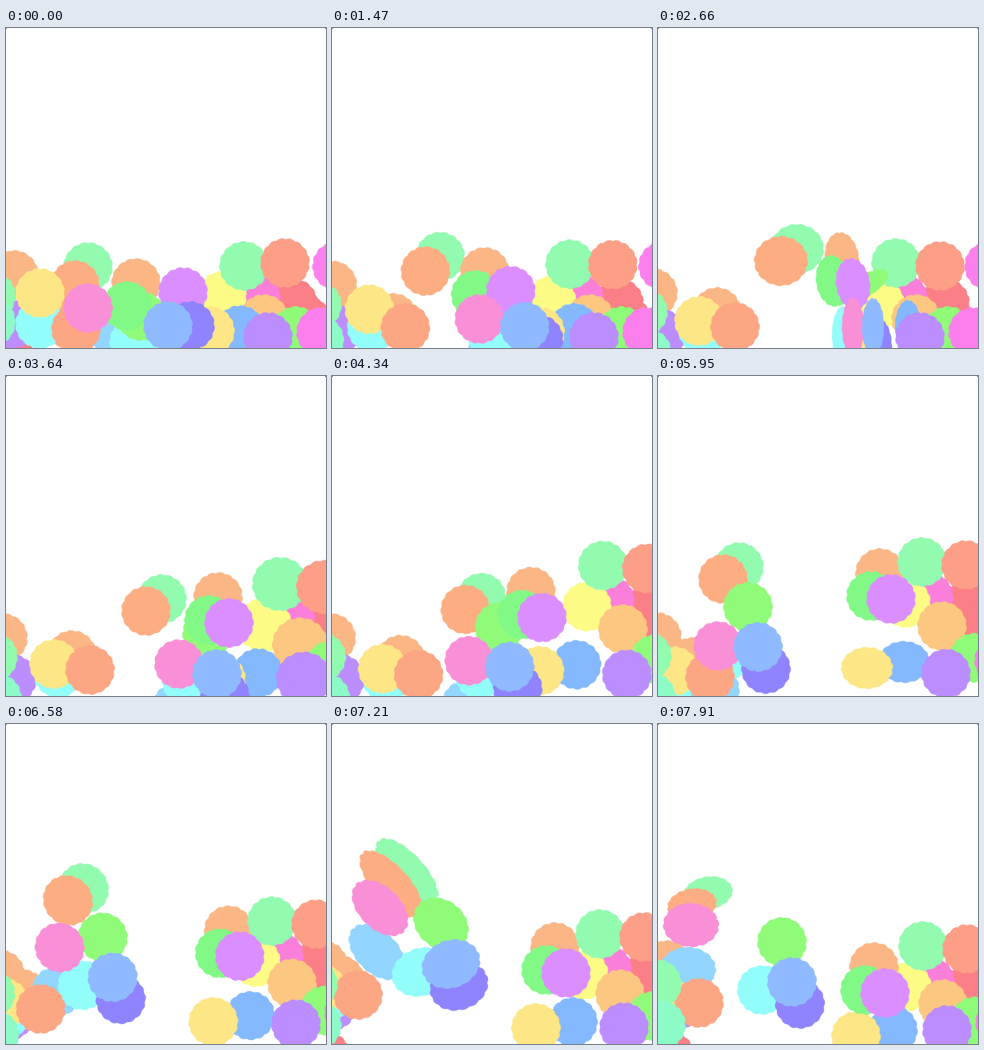
An HTML page with a canvas that plays this animation: 320 by 320 pixels, repeating every 7980 ms.

```html
<!DOCTYPE html>
<html lang="en">
<head>
<meta charset="utf-8">
<title>Soft pompoms</title>
<style>
html, body { margin: 0; width: 100%; height: 100%; overflow: hidden; background: #fff; }
canvas { display: block; width: 100vw; height: 100vh; }
</style>
</head>
<body>
<canvas id="stage"></canvas>
<script>
const SIZE = 320, LOOP = 7980, STEP = 70;
const R = 24.7, LOBES = 16, PULSE = 380;
const TIMES = [0, 2660, 3640, 5110, 5950, 7210, 7910];
const canvas = document.getElementById('stage');
const ctx = canvas.getContext('2d');

const COLORS = {
  orange: '#fab785', peach: '#fcae82', salmon: '#fda683', coral: '#fc9f86',
  red: '#fa7f86', mint: '#92fbaf', aqua: '#8dfbc8', lime: '#90fb78',
  green: '#82f987', cyan: '#93fdfa', sky: '#92d5ff', blue: '#84b8ff',
  azure: '#8fbaff', indigo: '#8f83fe', purple: '#bb8dff', violet: '#db8eff',
  pink: '#f98fd6', rose: '#f97fdb', magenta: '#fb80ee', lemon: '#fbfb85',
  yellow: '#fde685', apricot: '#fcc780'
};

// Stretch tensor for an ellipse with half axes a, b turned by deg.
function tensor(a, b, deg = 0) {
  const q = deg * Math.PI / 180, c = Math.cos(q), s = Math.sin(q);
  return [a * c * c + b * s * s, (a - b) * c * s, a * s * s + b * c * c];
}

// Shared travel of a cluster: offsets from home at TIMES; squash: key -> [a, b, deg].
const CLUSTERS = {
  wall: { x: [0, -6, -4, 0, -2, -10, 8], y: [0, 16, 13, 13, 12, -8, -8] },
  floor: { x: [0, 3, 10, 14, -22, -48, -33], y: [0, 11, 6, 16, 13, -17, -9] },
  head: {
    x: [0, 55, 72, 48, -3, -9, -34], y: [0, -21, -19, -25, -51, -94, -73],
    squash: { 1: [27, 25], 3: [29, 16, -18], 5: [43, 18, 48], 6: [25, 16, -12] }
  },
  hop: {
    x: [0, 113, 91, 10, -22, -34, -49], y: [0, 19, 8, 1, -10, -96, -79],
    squash: { 1: [11, 30], 3: [15, 27], 5: [34, 21, 45], 6: [28, 22] }
  },
  swing: {
    x: [0, 53, 49, -35, -62, -43, -28], y: [0, 1, 0, -19, -27, -58, -40],
    squash: { 1: [11, 29], 3: [22, 38, 6], 5: [30, 24, -20] }
  },
  shove: {
    x: [0, 54, 82, 54, 92, 93, 86], y: [0, -25, -34, -46, -58, -32, -12],
    squash: { 1: [17, 26, -8] }
  },
  low: {
    x: [0, 13, 15, -1, 9, 4, -2], y: [0, -1, -2, -19, -13, -1, 7],
    squash: { 1: [13, 26], 3: [24, 21], 4: [26, 21] }
  },
  pile: {
    x: [0, 0, 36, 28, 26, 30, 27], y: [0, 0, -27, -57, -49, -25, -13],
    squash: { 2: [28, 27] },
    lift: y => Math.min(1, (316 - y) / 30)  // upper balls are heaved higher
  }
};

const balls = [];

// Home place, then a lasting shift against the cluster and a turn of the squash.
function ball(cluster, color, x, y, dx = 0, dy = 0, turn = 0) {
  const { lift, squash = {}, ...track } = CLUSTERS[cluster];
  const pulses = Object.entries(squash).map(([k, [a, b, deg = 0]]) => {
    const m = tensor(a, b, deg + turn);
    return { t: TIMES[k], d: [m[0] - R, m[1], m[2] - R] };
  });
  balls.push({ color: COLORS[color], x, y, dx, dy, track, pulses, lift: lift ? lift(y) : 1, seed: balls.length * 1.7 });
}

ball('wall', 'red', 4, 328, 0, 12);
ball('wall', 'orange', 8, 247, -7, 2);
ball('floor', 'orange', 66, 298, -10, -25);
ball('head', 'mint', 82, 239, 2, 3);
ball('head', 'peach', 69, 257, -1, -3);
ball('wall', 'purple', 6, 296, 4, -6);
ball('floor', 'cyan', 34, 296, 8, -5);
ball('hop', 'sky', 112, 310, -33, 14);
ball('swing', 'cyan', 128, 314, 4, -8);
ball('floor', 'yellow', 34, 265, 4, 17);
ball('floor', 'salmon', 70, 301, 4, -13);

ball('pile', 'magenta', 331, 238);
ball('pile', 'red', 287, 275);
ball('pile', 'red', 300, 292, -10);
ball('pile', 'rose', 250, 270, -5);
ball('pile', 'lemon', 216, 268, 6, 8);
ball('shove', 'orange', 130, 255);
ball('pile', 'mint', 238, 238, 0, -3);
ball('pile', 'coral', 279, 235, 3, 3);
ball('pile', 'apricot', 258, 291);
ball('pile', 'lime', 290, 303);
ball('pile', 'magenta', 315, 304);
ball('low', 'blue', 234, 302, 3, -3);
ball('low', 'yellow', 204, 303, -4, 2);
ball('pile', 'purple', 262, 309);

ball('swing', 'lime', 135, 288, 17, -30, 59);
ball('shove', 'green', 121, 278);
ball('shove', 'violet', 177, 264, -36, 17);
ball('swing', 'indigo', 184, 298, -14, 22);
ball('hop', 'pink', 82, 280);
ball('swing', 'azure', 162, 298);
ball('wall', 'mint', -15, 268, 6, 0);
ball('wall', 'aqua', -15, 294, 10, 15);

const smooth = u => u * u * (3 - 2 * u);

function slope(v, k) {
  if (k === 0) return 0;
  const a = (v[k] - v[k - 1]) / (TIMES[k] - TIMES[k - 1]);
  if (k === TIMES.length - 1) return a * 0.6;
  const b = (v[k + 1] - v[k]) / (TIMES[k + 1] - TIMES[k]);
  return a * b <= 0 ? 0 : 2 * a * b / (a + b);
}

// Smooth path through the keys without overshoot.
function along(v, t) {
  let k = 0;
  while (k < TIMES.length - 2 && t >= TIMES[k + 1]) k++;
  const h = TIMES[k + 1] - TIMES[k];
  const u = Math.min(1, (t - TIMES[k]) / h), w = 1 - u;
  return v[k] + (v[k + 1] - v[k]) * smooth(u)
    + h * u * w * (w * slope(v, k) - u * slope(v, k + 1));
}

function shape(b, t) {
  const m = [R, 0, R];
  for (const p of b.pulses) {
    const w = Math.exp(-(((t - p.t) / PULSE) ** 2));
    for (let i = 0; i < 3; i++) m[i] += w * p.d[i];
  }
  return m;
}

function drawBall(b, t) {
  const settle = smooth(Math.min(1, t / TIMES[1]));
  const x = b.x + along(b.track.x, t) + b.dx * settle;
  const y = b.y + along(b.track.y, t) * b.lift + b.dy * settle;
  const [a, c, d] = shape(b, t);
  const roll = b.seed + (x - b.x) / 70;
  ctx.beginPath();
  for (let i = 0; i < 128; i++) {
    const q = i / 128 * Math.PI * 2;
    const r = 0.95 + 0.05 * Math.abs(Math.sin((q + roll) * LOBES / 2));
    const px = Math.cos(q) * r, py = Math.sin(q) * r;
    ctx.lineTo(x + a * px + c * py, y + c * px + d * py);
  }
  ctx.closePath();
  ctx.fillStyle = ctx.strokeStyle = b.color;
  ctx.fill();
  ctx.globalAlpha = 0.4;
  ctx.stroke();
  ctx.globalAlpha = 1;
}

function fit() {
  const s = window.devicePixelRatio || 1;
  canvas.width = Math.round(innerWidth * s);
  canvas.height = Math.round(innerHeight * s);
}

function draw(now) {
  const t = Math.floor((now % LOOP) / STEP) * STEP;
  ctx.setTransform(canvas.width / SIZE, 0, 0, canvas.height / SIZE, 0, 0);
  ctx.fillStyle = '#fff';
  ctx.fillRect(0, 0, SIZE, SIZE);
  for (const b of balls) drawBall(b, t);
  ctx.fillStyle = '#888';
  ctx.fillRect(0, 0, 1, 1);
  ctx.fillRect(SIZE - 1, 0, 1, 1);
}

const start = performance.now();
function tick() {
  draw(performance.now() - start);
  requestAnimationFrame(tick);
}
addEventListener('resize', fit);
fit();
tick();
</script>
</body>
</html>
```
